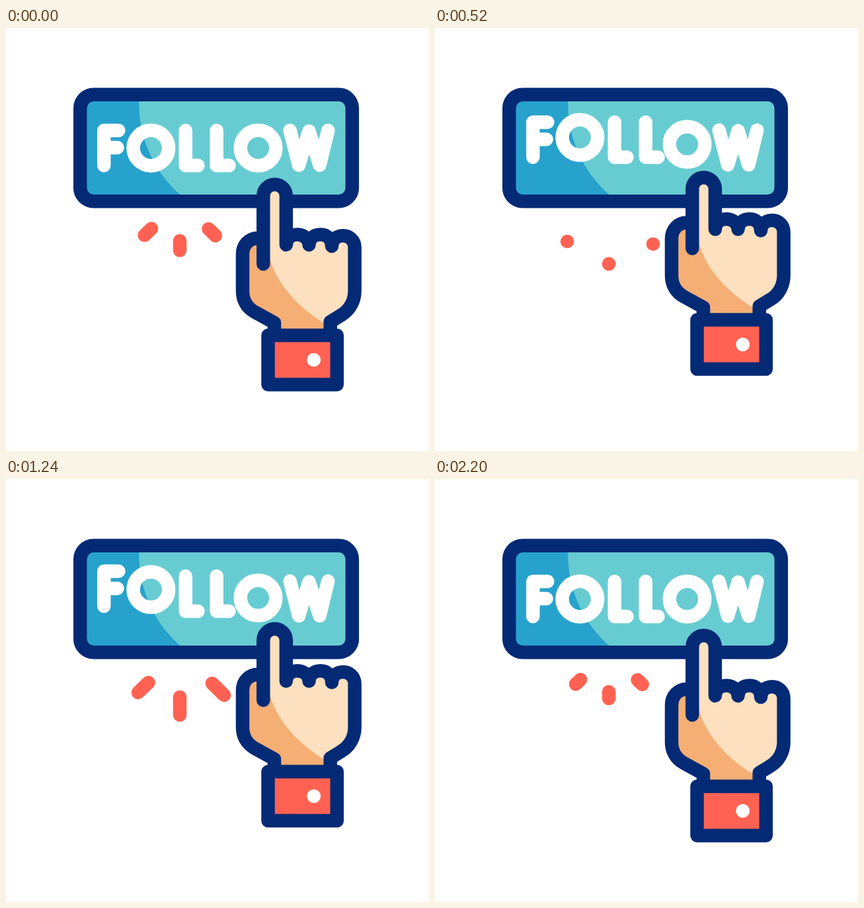
These frames come from a looping animation (640x640 px, 2240 ms). An HTML page:

```html
<!DOCTYPE html>
<html lang="en">
<head>
<meta charset="utf-8">
<title>Follow button</title>
<style>
  html, body { margin: 0; width: 100%; height: 100%; overflow: hidden; background: #fff; }
  svg { display: block; width: 100%; height: 100%; }
  .line { fill: none; stroke: #042a75; stroke-width: 20.5; stroke-linecap: round; stroke-linejoin: round; }
  .type { fill: none; stroke: #fff; stroke-width: 20.5; stroke-linecap: round; stroke-linejoin: round; }
  .ray { stroke: #ff6252; stroke-width: 20.5; stroke-linecap: round; }
</style>
</head>
<body>
<svg viewBox="0 0 640 640" role="img" aria-label="FOLLOW">
  <rect x="112" y="100.8" width="412" height="161.5" rx="21" fill="#67ccd2"/>
  <path d="M118 106H201.3C199.5 165 223 217 264.5 253V257H118Z" fill="#27a2cd"/>
  <rect class="line" x="112.2" y="100.8" width="411.6" height="161.5" rx="20.5"/>

  <g class="type">
    <path class="letter" d="M148.2 208V155H170.3M148.2 181H168.5"/>
    <circle class="letter" cx="219.3" cy="181.6" r="26.8"/>
    <path class="letter" d="M271.7 155V208H290.5"/>
    <path class="letter" d="M318.7 155V208H337.5"/>
    <circle class="letter" cx="381.5" cy="181.6" r="26.8"/>
    <path class="letter" d="M429.7 155L443 207.5L458.5 156L474.5 207.5L487.3 155"/>
  </g>

  <g id="rays"></g>

  <g id="hand">
    <path id="skin" fill="#fce0bf"/>
    <path fill="#f5af75" d="M399.5 350C412 392 446 425 482 447V462H406V446L376 429.5C364.5 423 358 412 358 398V342C358 328 368 318 381 318H389.5V350Z"/>
    <path id="outline" class="line"/>
    <rect class="line" x="396.5" y="465" width="104.3" height="74.4" style="fill:#ff6252"/>
    <circle cx="465.7" cy="502.2" r="10.4" fill="#fff"/>
  </g>
</svg>
<script>
const LOOP = 2240, FRAME = 40;
const LETTER_RISE = 400, HAND_RISE = 357;
const $ = id => document.getElementById(id);
const letters = [...document.querySelectorAll('.letter')];
const letterDelays = [0, 120, 240, 240, 360, 480];

const ease = (t, from, to) => {
  const x = Math.min(1, Math.max(0, (t - from) / (to - from)));
  return x * x * (3 - 2 * x);
};

// Two equal hops in a row, each rising and falling in the same time.
const hops = (t, rise) => {
  if (t < 0 || t > 4 * rise) return 0;
  return 1 - ease(Math.abs(t % (2 * rise) - rise), 0, rise);
};

const rays = [
  [220, 303.5, 200, 323],
  [263, 322, 263, 357],
  [306.5, 304, 330, 327]
].map(([x1, y1, x2, y2]) => {
  const el = document.createElementNS('http://www.w3.org/2000/svg', 'line');
  el.setAttribute('class', 'ray');
  $('rays').append(el);
  const rest = 14.5 / Math.hypot(x2 - x1, y2 - y1);
  return { el, x1, y1, x2, y2, rest };
});

// Start and end of the visible part of a ray, as fractions of its path.
function trim(t, rest) {
  if (t < 800) {
    const k = ease(t, 0, 540);
    return [k, rest + (1 - rest) * k];
  }
  if (t < 1600) return [ease(t, 1080, 1600), ease(t, 800, 1200)];
  return [0, ease(t, 2050, 2450) * rest / 0.462];
}

function drawRay(ray, t) {
  const [tail, head] = trim(t, ray.rest);
  const { el, x1, y1, x2, y2 } = ray;
  const place = (n, k) => {
    el.setAttribute('x' + n, x1 + (x2 - x1) * k);
    el.setAttribute('y' + n, y1 + (y2 - y1) * k);
  };
  place(1, tail);
  place(2, head);
  el.style.display = head > tail ? '' : 'none';
}

function drawHand(t) {
  const lift = 41.4 * hops(t, HAND_RISE);
  const tip = 254 + 0.55 * lift;
  const finger = `V${tip}A17.3 17.3 0 0 1 423.9 ${tip}V328`;
  const knuckles = 'C424 318 432 312.5 441 312.5S458.5 319 458.5 328' +
    'C458.5 318 467 312.5 476 312.5S493 319 493 330' +
    'C493 320 501 314.3 510 314.3S527.6 321 527.6 332';
  const wrist = 'V398C527.6 413 520 427 507 434.5L490.7 444.5V460';
  const palm = 'M406 460V446L376 429.5C364.5 423 358 412 358 398V342C358 328 368 318 381 318';
  $('skin').setAttribute('d', `${palm}H389.3${finger}${knuckles}${wrist}Z`);
  $('outline').setAttribute('d', `${palm}H389.3M389.3 357${finger}${knuckles}${wrist}`);
  $('hand').setAttribute('transform', `translate(0 ${-lift})`);
}

function draw(t) {
  letters.forEach((el, i) => {
    const lift = 16 * hops(t - letterDelays[i], LETTER_RISE);
    el.setAttribute('transform', `translate(0 ${-lift})`);
  });
  rays.forEach(ray => drawRay(ray, t));
  drawHand(t);
}

const start = performance.now();
function tick() {
  const elapsed = performance.now() - start;
  draw(Math.floor(elapsed / FRAME) * FRAME % LOOP);
  requestAnimationFrame(tick);
}
tick();
</script>
</body>
</html>
```
